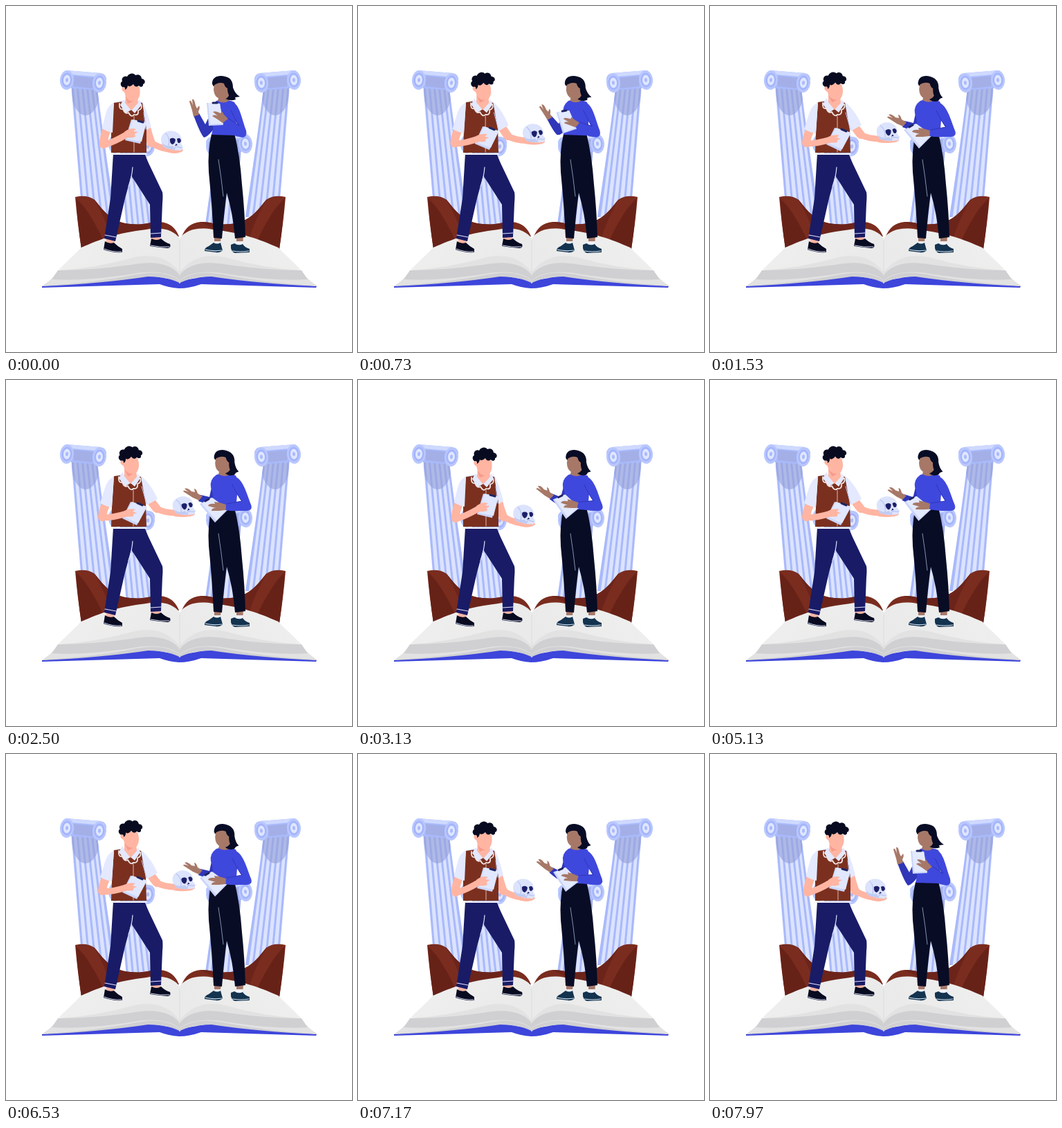
Write an HTML page that moves like this. It is 500x500 px and loops after 8.01 s.

```html
<!DOCTYPE html>
<html lang="en">
<head>
<meta charset="utf-8">
<title>Study on an open book</title>
<style>
html, body { margin: 0; width: 100%; height: 100%; overflow: hidden; background: #fff; }
svg { display: block; width: 100vw; height: 100vh; }
</style>
</head>
<body>
<svg id="stage" viewBox="0 0 500 500" fill="none" stroke-linecap="round" stroke-linejoin="round">
  <defs>
    <clipPath id="shaftClip"><path d="M94 116L132 120Q142 200 158 305L110 305Z"/></clipPath>
    <linearGradient id="page" x2="1" y2=".4">
      <stop stop-color="#f0f0ef"/><stop offset="1" stop-color="#eaeaea"/>
    </linearGradient>
    <g id="column">
      <path fill="#dbe3ff" d="M94 116L132 120Q142 200 158 305L110 305Z"/>
      <g id="flutes" clip-path="url(#shaftClip)" stroke="#a9b9fb" stroke-linecap="butt"></g>
      <ellipse cx="115" cy="125" rx="20" ry="33" fill="#939fd8" opacity=".6" clip-path="url(#shaftClip)"/>
      <path fill="#a9bafc" d="M87 93L137 97Q145 99 145 106L137 122L94 119L82 98Z"/>
      <path fill="#cfd9ff" d="M88 93L137 97Q143 99 140 103L94 99Q88 97 84 94Z"/>
      <path fill="#a3afe6" d="M96 101L128 104L125 119L98 116Z"/>
      <g id="scrolls"></g>
    </g>
    <g id="cover">
      <path fill="#7a2c1e" d="M100 276Q117 272 128 280C139 293 151 313 180 315C201 317 211 311 223 312C236 313 245 320 250 333L200 346L109 351Q103 312 100 276Z"/>
      <path fill="#672218" d="M101 278Q114 289 125 309Q136 326 145 350L109 351Q104 318 101 278Z"/>
      <path fill="#6c241a" d="M127 279C139 293 151 313 180 315C201 317 211 311 223 312L190 328L154 340Q143 305 127 279Z"/>
    </g>
    <g id="leaves">
      <path fill="#d0d0d3" d="M109 349Q85 383 52 405Q139 401 205 391Q235 391 252 401L252 337Z"/>
      <path fill="#e2e2e2" d="M109 349Q75 388 54 404Q119 401 178 390Q229 378 252 398L252 337Z"/>
      <path fill="#d0d0d3" d="M75 382Q123 382 181 374Q233 364 252 390L252 397Q229 378 178 388Q111 398 66 395Z"/>
      <path fill="url(#page)" d="M109 349C136 337 160 328 203 323C225 319 242 323 252 337L252 386Q228 354 186 363Q130 379 75 382Z"/>
    </g>
  </defs>
  <use href="#column"/>
  <use href="#column" transform="translate(504) scale(-1 1)"/>
  <use href="#column" transform="translate(70 92)"/>
  <use href="#column" transform="translate(434 92) scale(-1 1)"/>
  <use href="#cover"/>
  <use href="#cover" transform="translate(504) scale(-1 1)"/>
  <path fill="#3d45db" d="M52 405L210 390L252 397L294 390L449 405L448 407L282 402Q265 408 250 408Q235 407 222 402L52 407Z"/>
  <use href="#leaves"/>
  <use href="#leaves" transform="translate(502) scale(-1 1)"/>
  <path stroke="#dcdcde" d="M251 339V385"/>
</svg>
<script>
const NS = 'http://www.w3.org/2000/svg';
const stage = document.getElementById('stage');
const updates = [];

function add(parent, tag, attrs) {
  const el = document.createElementNS(NS, tag);
  for (const key in attrs) el.setAttribute(key, attrs[key]);
  return parent.appendChild(el);
}

// Blend every number of path a with its partner in path b; both need the same commands.
function mix(a, b, k) {
  const ends = b.match(/-?[\d.]+/g);
  let i = 0;
  return a.replace(/-?[\d.]+/g, n => (+n + (ends[i++] - n) * k).toFixed(2));
}

function figure(pose) {
  const layer = add(stage, 'g', {});
  const shape = (attrs, a, b, parent = layer) => {
    const el = add(parent, 'path', { ...attrs, d: a });
    if (b) updates.push(t => el.setAttribute('d', mix(a, b, pose(t))));
  };
  return {
    fill: (color, a, b, parent) => shape({ fill: color }, a, b, parent),
    line: (color, width, a, b, parent) => shape({ stroke: color, 'stroke-width': width }, a, b, parent),
    group(transform) {
      const g = add(layer, 'g', {});
      updates.push(t => g.setAttribute('transform', transform(pose(t))));
      return g;
    }
  };
}

const ease = p => {
  p = Math.min(1, Math.max(0, p));
  return p * p * (3 - 2 * p);
};
const swing = (out, outEnd, back, backEnd) => t =>
  ease((t - out) / (outEnd - out)) - ease((t - back) / (backEnd - back));

const flutes = document.getElementById('flutes');
for (let i = 0; i < 6; i++) {
  add(flutes, 'path', { d: `M${96 + i * 7} 114Q${103 + i * 7.7} 200 ${112 + i * 8.8} 306`, 'stroke-width': i == 5 ? 5 : 3 });
}
const scrolls = document.getElementById('scrolls');
for (const [x, y] of [[88, 107], [135, 111]]) {
  [['#b9c7ff', 10, 14], ['#a4b5fb', 7.5, 10.5], ['#dfe6ff', 5, 7.5], ['#a9bafc', 2, 3]].forEach(([fill, rx, ry]) =>
    add(scrolls, 'ellipse', { cx: x, cy: y, rx, ry, fill, transform: `rotate(4 ${x} ${y})` }));
}

const skin = '#ffb5a2', rust = '#7b301f', navy = '#191b66', pale = '#e4e9ff', ink = '#080b20';
const man = figure(swing(200, 920, 2480, 3180));

// Legs and shoes
man.fill(skin, 'M145 333L157 336L156 345L145 343ZM211 331L223 331L223 341L211 340Z');
man.fill(ink, 'M143 340Q149 344 156 342Q162 348 168 351V356Q154 357 141 352ZM210 336Q218 340 224 336Q230 342 237 344Q239 349 234 350Q220 349 208 347Z');
man.line('#d9defa', 1, 'M142 351Q154 356 167 355M209 346Q222 349 236 348');
man.fill(navy, 'M155 213H200L206 227L226 269Q227 274 226 285L224 334L209 335L208 287L181 245L172 278L158 340L142 336L151 278Z');
man.line('#dde3ff', 1.2, 'M143 331L159 334M209 329L224 328M183 233Q182 247 177 261');

// Far arm with the skull
man.line(skin, 12, 'M203 176Q207 191 210 198', 'M206 170Q215 183 218 186');
man.line(skin, 9, 'M209 197Q221 205 235 207', 'M217 186Q230 192 245 192');
man.fill(skin, 'M230 203Q242 206 255 207Q258 210 250 212Q240 215 229 209Z', 'M243 188Q258 191 272 191Q276 195 267 197Q255 199 243 197Z');
const skull = man.group(k => `translate(${17 * k} ${-12.5 * k}) rotate(${-9 * k} 240 195)`);
man.fill('#dce3fc', 'M225 198C220 182 239 176 249 184Q256 190 253 199L256 204L253 209L241 208L235 206Q228 206 225 198Z', '', skull);
man.fill('#bfcbf4', 'M225 197Q230 204 241 202L244 208L234 206Q227 205 225 197Z', '', skull);
man.line('#aebdf0', 1, 'M231 184Q238 191 235 202M243 207L245 203L254 205', '', skull);
man.fill('#1c1f68', 'M237 192Q242 189 245 193Q244 200 240 200Q236 197 237 192ZM247 192Q252 189 253 195Q251 200 248 197ZM246 199L248 201L244 202Z', '', skull);

// Torso
man.fill(pale, 'M156 139Q177 133 198 139Q205 155 210 175L202 180L154 183L139 177Q145 146 156 139Z', 'M156 139Q177 133 197 140Q211 153 219 172L205 180L153 184L137 178Q145 146 156 139Z');
man.fill(rust, 'M156 140Q177 136 197 140L203 178L203 212L152 212L152 184Z', 'M156 139Q177 135 195 140L202 179L203 212L152 212L153 184Z');
man.line('#eef0ff', 2, 'M153 214H203');
man.line('#c0c8ed', 1, 'M153 157L152 181M199 154L202 178', 'M154 157L152 182M196 154L203 178');
man.fill(pale, 'M170 135L181 150L193 135L196 143L186 155L181 150L173 155L165 143Z', 'M168 133L180 149L191 135L194 142L186 154L180 149L172 154L163 142Z');
man.fill(skin, 'M173 130L190 131L191 140L181 151L172 140Z', 'M171 128L188 130L189 140L180 150L171 139Z');
man.line('#f3e5e4', 1.8, 'M164 141Q163 150 169 149Q172 157 177 154Q181 162 185 157Q192 159 191 151Q198 149 195 142', 'M163 140Q162 149 168 148Q171 156 176 153Q180 161 184 157Q191 158 190 150Q196 148 194 142');
man.line('#d9b9b1', 1, 'M185 159V211', 'M184 159V211');

const manHead = man.group(k => `translate(0 ${-2.2 * k}) rotate(${-7 * k} 181 138)`);
man.fill(skin, 'M171 117Q182 110 193 117Q195 128 191 134Q187 141 180 138Q170 133 171 117Z', '', manHead);
man.fill('#f69b8c', 'M172 130Q177 138 184 138L176 141Z', '', manHead);
man.fill(ink, 'M171 119C164 116 165 110 168 109C166 103 172 100 175 102C179 96 185 97 187 100C194 97 196 103 196 105C202 106 202 112 198 113C199 117 194 118 192 115Q187 119 184 113Q179 118 176 115Q175 120 172 121Z', '', manHead);
man.fill(skin, 'M172 118C167 114 165 123 172 125Z', '', manHead);

// Near arm with the clipboard
man.line(skin, 12, 'M146 178Q141 190 141 200', 'M145 178Q140 188 139 198');
man.fill('#cbd5fb', 'M181 164L202 168L194 199L172 194Z', 'M180 176L203 183L189 210L168 200Z');
man.fill('#e0e7ff', 'M183 164L203 168L196 196L174 192Z', 'M182 176L204 183L191 207L170 198Z');
man.line('#20245f', 3, 'M191 166L198 168', 'M190 178L197 181');
man.line(skin, 9, 'M141 201Q155 197 174 186', 'M139 199Q155 199 174 193');
man.fill(skin, 'M171 182Q180 175 188 178L184 181L191 182L186 185L187 189Q179 192 172 189Z', 'M171 189Q179 185 187 187L183 190L189 192L184 194L184 197Q177 198 171 197Z');
man.fill(pale, 'M156 140Q147 143 144 156L139 177Q147 182 154 183Z', 'M156 140Q147 143 143 156L136 178Q145 183 153 184Z');

const brown = '#a77867', blue = '#3f48dc', deep = '#2f36b8', black = '#080c25';
const woman = figure(swing(380, 1270, 2930, 3730));

// Legs and shoes
woman.fill(brown, 'M301 332L311 334L309 346L301 345ZM333 332L343 333L342 346L333 345Z');
woman.fill('#eef1fa', 'M301 340L310 340L310 347L301 346ZM333 340L343 340L342 347L333 346Z');
woman.fill('#13334f', 'M300 342Q305 345 310 342L313 353Q309 357 303 356L287 354Q286 350 293 347ZM325 345L330 343Q336 347 342 344Q345 349 352 351V356L331 357Q324 355 325 345Z');
woman.line('#d5e2ef', 1.2, 'M288 352Q300 355 312 353M327 354Q339 356 351 354');
woman.fill(black, 'M297 185L330 184Q338 215 341 258Q345 297 346 334L331 336Q328 300 319 270Q315 300 312 336L300 335Q298 291 293 240Q291 210 297 185Z');
woman.line('#8790a9', 1, 'M307 222Q311 247 314 275');

// Far arm
woman.fill(deep, 'M300 146L304 172Q293 189 286 190Q281 185 271 158L279 155L288 171Z', 'M299 146L304 177Q299 184 291 179Q287 178 278 175L281 166L294 169Z');
woman.fill(brown, 'M271 160L269 151L265 138Q267 134 270 144L269 135Q272 133 274 144L276 148L279 144Q281 147 278 152L279 157Z', 'M279 174L270 170L256 161Q257 158 264 162L258 157Q262 155 268 161L273 162L272 157Q275 157 277 164L284 168Z');

// Torso
woman.fill(blue, 'M304 137Q318 133 330 139Q336 149 333 166L331 187L297 186Q302 169 297 153Q296 144 304 137Z', 'M304 137Q318 132 332 138Q338 149 334 166L332 188L296 186Q302 169 296 155Q294 144 304 137Z');
woman.fill(brown, 'M308 129L321 130L322 137Q314 142 306 137Z', 'M309 129L321 130L323 137Q315 141 307 136Z');

const womanHead = woman.group(k => `translate(${k} 0) rotate(${4 * k} 316 137)`);
woman.fill(black, 'M298 113C297 102 308 99 317 102C326 104 328 111 328 118Q331 127 338 131L331 132L332 135Q325 138 317 134Z', 'M298 114C297 103 306 100 315 102C325 104 328 111 328 118Q330 127 335 131L331 133L329 136Q323 139 317 136Z', womanHead);
woman.fill(brown, 'M301 111Q310 107 317 111Q323 118 323 128Q318 138 309 134Q301 132 300 121Z', '', womanHead);
woman.fill(black, 'M299 112Q306 100 318 106Q326 115 324 132Q320 127 320 119Q316 117 315 112Q307 109 299 116Z', '', womanHead);

// Clipboard and near arm
woman.fill('#cbd5fb', 'M290 140L309 141L314 172L293 173Z', 'M280 179L297 170L320 188L302 206Z');
woman.fill('#e3e9ff', 'M292 140L309 141L314 170L295 171Z', 'M283 179L298 170L320 186L304 203Z');
woman.line('#20245f', 3, 'M299 140L305 140', 'M288 175L293 172');
woman.fill(blue, 'M328 139C338 144 340 161 347 180Q349 189 342 190L332 188Q321 179 313 168L320 161L334 171L327 154Z', 'M330 139C343 144 347 162 354 180Q357 188 349 189L337 189Q327 190 317 188L318 179L340 175L329 157Z');
woman.line(deep, 1, 'M325 151Q331 164 337 173L321 162', 'M327 151Q334 166 341 175L319 179');
woman.fill(brown, 'M313 169L306 164L298 159Q301 156 306 159L299 153Q303 151 310 155L312 152L315 157L321 163Z', 'M317 188L308 189L297 189Q297 185 303 185L292 182Q293 178 302 179L301 176L308 177L318 180Z');

function draw(now) {
  const t = now % 8010 % 4005;
  updates.forEach(update => update(t));
  requestAnimationFrame(draw);
}
draw(performance.now());
</script>
</body>
</html>
```
